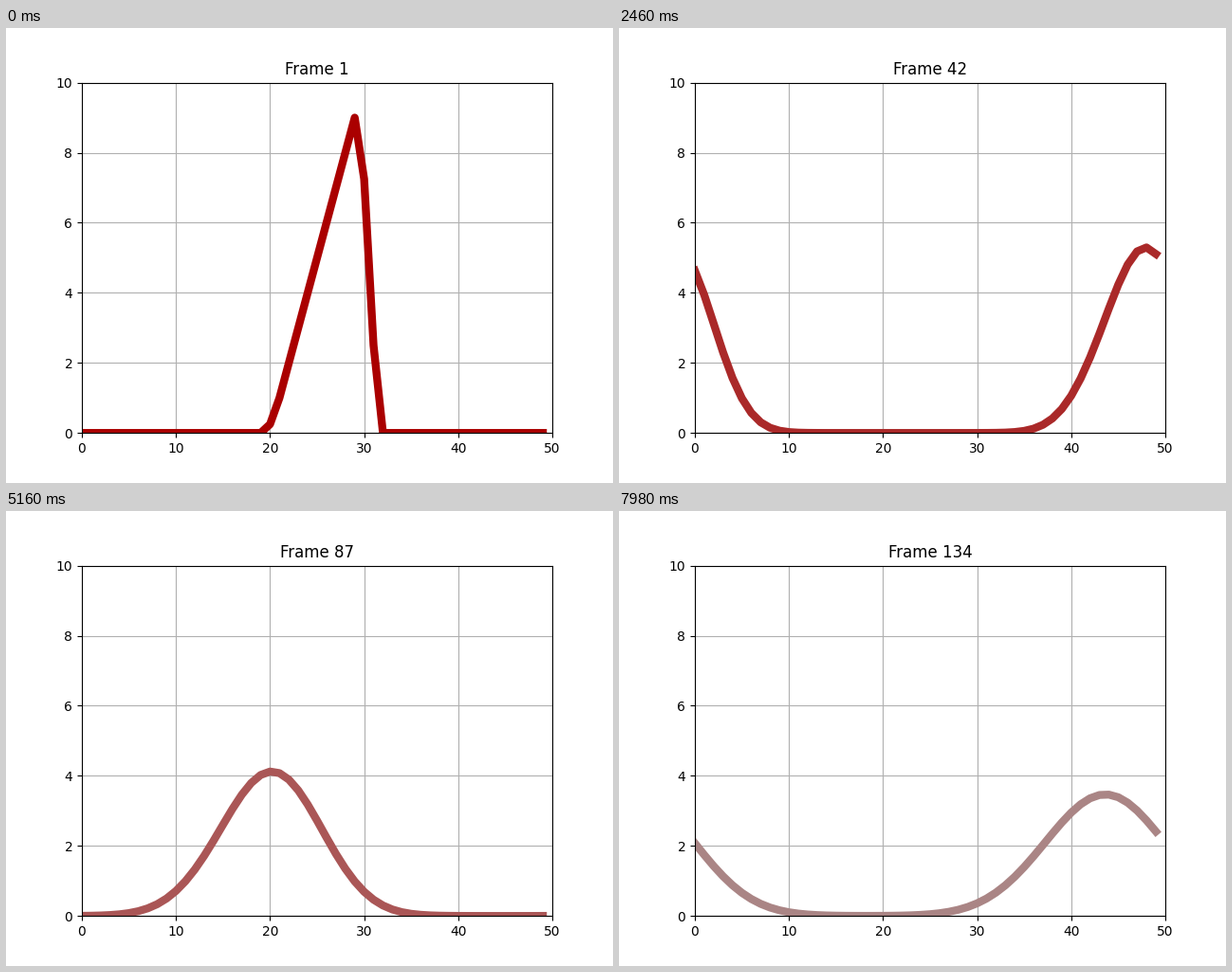
A matplotlib script that plays this animation: 640 px wide and 480 px high, repeating every 8000 ms.

```python
import numpy as np
import matplotlib.pyplot as plt
from matplotlib.animation import FuncAnimation

CELLS = 50
COURANT = 0.5      # fraction of a cell moved per time step
STATES = 134
TICK = 20          # ms per drawn frame
HOLD = 3           # drawn frames per state
LOOP = 8000


def advect(u):
    """One upwind step on a periodic grid."""
    return u - COURANT * (u - np.roll(u, 1))


def solve():
    u = np.zeros(CELLS)
    u[20:30] = np.arange(1, 11)
    u = advect(u)
    states = []
    for _ in range(STATES):
        u = advect(u)
        states.append(u)
    return states


states = solve()

fig, ax = plt.subplots(figsize=(6.4, 4.8), dpi=100)
ax.set_xlim(0, CELLS)
ax.set_ylim(0, 10)
ax.grid(True)
title = ax.set_title("Frame 1")
line, = ax.plot(np.arange(CELLS), states[0], lw=6, color="#aa0000")


def update(tick):
    k = min(tick // HOLD, STATES - 1)
    line.set_ydata(states[k])
    line.set_color((170 / 255, k / 255, k / 255))
    title.set_text(f"Frame {k + 1}")
    return line, title


anim = FuncAnimation(fig, update, frames=LOOP // TICK, interval=TICK,
                     init_func=lambda: update(0), repeat=True, repeat_delay=0)
plt.show()
```
